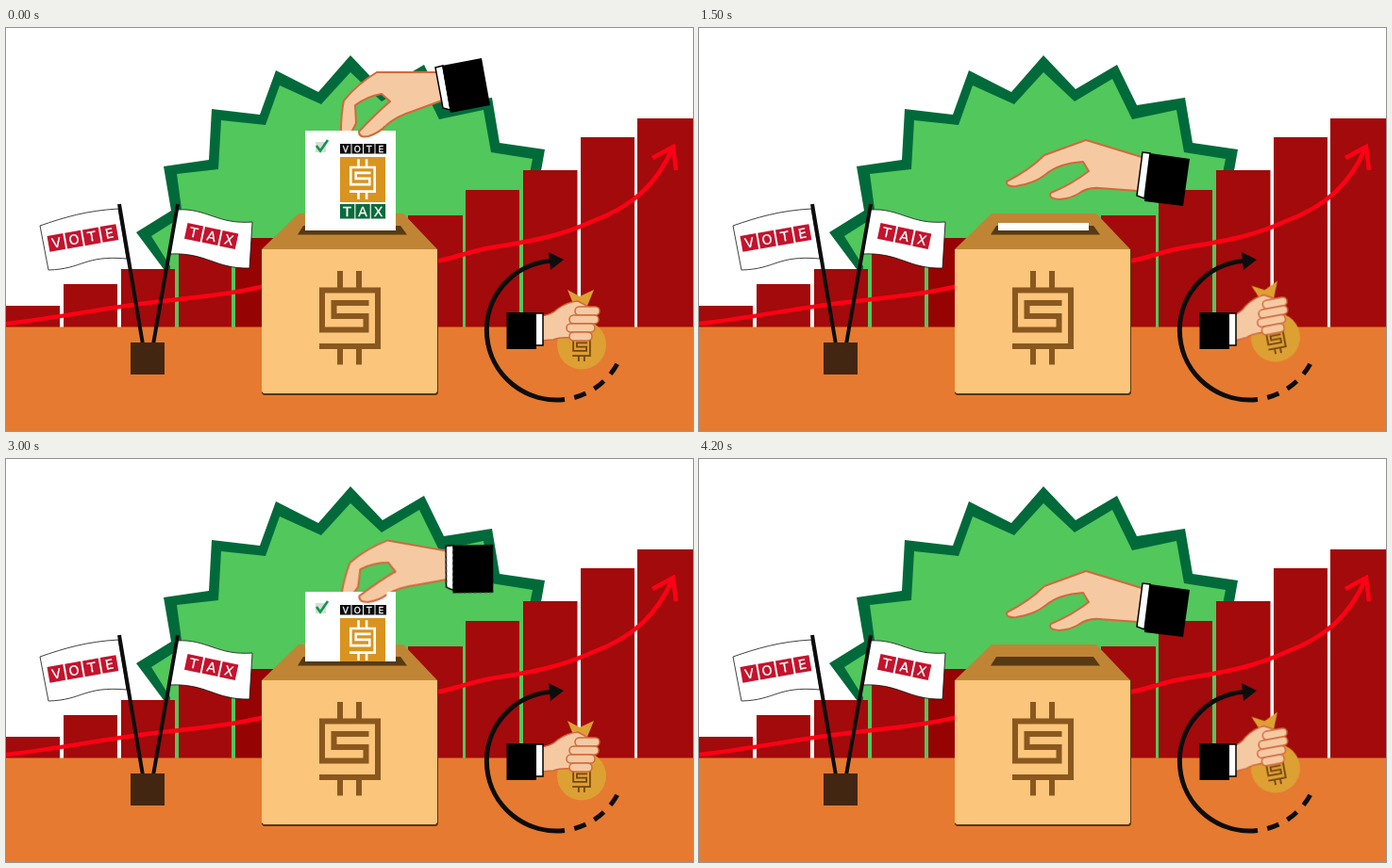
These frames come from a looping animation (728 px wide and 428 px high, 4.6 s). An HTML page:

```html
<!DOCTYPE html>
<html lang="en">
<head>
<meta charset="utf-8">
<title>Vote Tax</title>
<style>
  html, body { margin: 0; width: 100%; height: 100%; overflow: hidden; background: #fff; }
  svg { display: block; }
  text { font-family: "DejaVu Sans", sans-serif; fill: #fff; stroke: #fff; stroke-width: .3; text-anchor: middle; }
  .line { fill: none; stroke: #0d0d0d; }
  .skin { fill: #f5caa3; stroke: #d2693c; stroke-width: 2; stroke-linejoin: round; }
  .mark { fill: none; stroke-width: 6; }

  .card { animation: drop 2300ms step-end infinite; }
  .pinch { animation: pinch 2300ms step-end infinite; }
  .spread { animation: spread 2300ms step-end infinite; }
  .fist { animation: shake 4600ms step-end infinite; }

  @keyframes drop {
    0% { transform: none; }
    30.43% { transform: translateY(32px); }
    47.82% { transform: translateY(64px); }
    65.21% { transform: translateY(98px); }
    82.6%, 100% { transform: translateY(140px); }
  }
  @keyframes pinch {
    0% { transform: none; visibility: visible; }
    30.43% { transform: translate(356px, 141px) rotate(10deg) translate(-355px, -109px); visibility: visible; }
    47.82%, 100% { visibility: hidden; }
  }
  @keyframes spread {
    0% { visibility: hidden; }
    47.82%, 100% { visibility: visible; }
  }
  /* The fist swaps pose on every step of the ballot. */
  @keyframes shake {
    0%, 23.91%, 41.3%, 65.21%, 82.6% { transform: none; }
    15.21%, 32.6%, 50%, 73.91%, 91.3%, 100% {
      transform: translate(611px, 329px) rotate(-10.6deg) translate(-610px, -337px);
    }
  }
</style>
</head>
<body>
<svg width="728" height="428" viewBox="0 0 728 428">
  <defs>
    <g id="coin">
      <path d="M-10.500-31V-49.500M9.500-31V-49.500M-10.500 31V50M9.500 31V50"/>
      <path d="M20-15.500H-17V-1.500H17V13H-29.500V-29H29.500V30.500H-32.500"/>
    </g>
    <clipPath id="slot"><path d="M300 90H430V215H300Z"/></clipPath>
  </defs>

  <path fill="#006a3a" d="M138 217L175 194 167 147 215 140 218 86 269 92 286 45 331 68 365 29 399 65 443 39 464 82 515 74 523 122 571 129 562 180V318H170V260Z"/>
  <path fill="#52c75c" d="M154 221L187 200 181 155 225 150 228 98 275 103 290 61 334 81 365 47 398 78 438 54 459 97 506 87 514 132 558 139 551 175V318H174V253Z"/>
  <path fill="#a20a0b" d="M0 318V295H57V318ZM61 318V272H118V318ZM122 318V256H179V318ZM183 318V239H239V318ZM426 318V199H484V318ZM487 318V172H544V318ZM548 318V151H605.500V318ZM609 318V116H666V318ZM669 318V96H728V318Z"/>
  <path fill="#960303" d="M243 318V223H300V318Z"/>
  <path fill="#e67a30" d="M0 317.500H728V428H0Z"/>
  <g fill="none" stroke="#ff0015" stroke-width="4.500">
    <path d="M0 314C60 307 100 298 150 292S230 284 275 274M455 248C485 242 490 237 515 233C560 226 590 220 622 205C665 189 690 165 706 128"/>
    <path d="M685 138L707 126 710 151"/>
  </g>

  <g id="flags" stroke="#111" stroke-width=".8">
    <path fill="#fff" d="M36 210C62 201 85 194 119 192L128 245C82 241 82 256 45 257Z"/>
    <path fill="#fff" d="M181 193C213 191 224 209 261 206L258 255C222 256 212 238 174 240Z"/>
    <path class="line" stroke-width="4" d="M120 187L145 336M182 187L156 336"/>
    <path fill="#422611" stroke="none" d="M132 334H168V368H132Z"/>
  </g>

  <path fill="#57380f" d="M272 235H458V388L456 390H273L271 388Z"/>
  <path fill="#fbc57c" d="M271 235H457V386L455 388H273L271 386Z"/>
  <path fill="#bf8535" d="M271 235L310 197H421L457 235Z"/>
  <path fill="#573a13" d="M315 210H418L425 219.500H309Z"/>
  <use href="#coin" class="mark" stroke="#8a581f" x="364.500" y="307.500"/>

  <g class="pinch">
    <path class="skin" d="M458 47H393Q373 59 358 77Q355 92 355 109L360 113 367 109 371 101 370 82Q384 72 398 70L407 78Q392 91 374 110Q374 117 384 115Q396 111 402 104Q413 94 432 88L462 77"/>
    <path fill="#fff" stroke="#000" stroke-width="1.500" d="M455 42L463 40 471 87 463 85Z"/>
    <path fill="#000" d="M462 40L504 32 513 82 471 90Z"/>
  </g>

  <g clip-path="url(#slot)">
    <g class="card" id="card">
      <path fill="#fff" d="M317 109H413V330H317Z"/>
      <path fill="#d9dcd8" d="M328 121H339V132H328Z"/>
      <path fill="none" stroke="#0b9a4b" stroke-width="2.600" d="M329 125L333 130.500 341 119"/>
      <path fill="#d9941f" d="M354 137H402V185H354Z"/>
      <use href="#coin" class="mark" stroke="#fff" transform="translate(378 160.500) scale(.43)"/>
    </g>
  </g>

  <path class="pinch skin" d="M407 78Q392 91 374 110Q374 117 384 115Q396 111 402 104"/>
  <g class="spread">
    <path class="skin" d="M469 137L410 119 366 135Q350 151 326 163Q325 169 336 168Q356 165 368 155Q381 144 407 142L413 152Q395 166 373 175Q369 181 382 182Q394 181 402 176Q412 169 424 170L465 173"/>
    <path fill="#fff" stroke="#000" stroke-width="1.500" d="M470 132L478 133 472 181 464 178Z"/>
    <path fill="#000" d="M478 133L520 139 513 189 472 184Z"/>
  </g>

  <path class="line" stroke-width="5" d="M578 247.200A74 74 0 1 0 592 394.500"/>
  <path class="line" stroke-width="5" stroke-dasharray="13 10.200" d="M602.200 392.500A74 74 0 0 0 647.700 356.900"/>
  <path fill="#0d0d0d" d="M575 238L591 246 577 257Z"/>

  <g class="fist">
    <path fill="#dda033" d="M595 278L608 285 623 278 616 295H602Z"/>
    <circle cx="610" cy="336.500" r="26" fill="#dda033"/>
    <use href="#coin" class="mark" stroke="#734612" transform="translate(610 339) scale(.3)"/>
    <g class="skin" style="stroke-width:1.500">
      <path d="M566 306Q578 305 585 298Q595 291 606 290L617 296 600 329Q587 328 580 331L566 332"/>
      <rect x="603" y="296" width="26" height="9" rx="4.500"/>
      <rect x="597" y="305" width="31" height="9" rx="4.500"/>
      <rect x="594" y="314" width="30" height="9" rx="4.500"/>
      <rect x="597" y="323" width="24" height="9" rx="4.500"/>
    </g>
  </g>
  <path fill="#fff" stroke="#000" stroke-width="1.500" d="M561 303H569V337H561Z"/>
  <path fill="#000" d="M530.500 302H562V341H530.500Z"/>
</svg>
<script>
  function add(parent, name, attrs) {
    const node = document.createElementNS("http://www.w3.org/2000/svg", name);
    for (const key in attrs) node.setAttribute(key, attrs[key]);
    return parent.appendChild(node);
  }

  // A row of coloured tiles, one letter on each.
  function tiles(id, word, { x, y, w, h, step, fill, size, turn = 0 }) {
    const row = add(document.getElementById(id), "g",
      { transform: `translate(${x} ${y}) rotate(${turn})`, stroke: "none" });
    [...word].forEach((letter, i) => {
      add(row, "rect", { x: i * step, y: 0, width: w, height: h, fill });
      add(row, "text", { x: i * step + w / 2, y: h / 2 + size * 0.365, "font-size": size })
        .textContent = letter;
    });
  }

  tiles("card", "VOTE", { x: 354, y: 123, w: 11.5, h: 10.5, step: 12.5, fill: "#0b0b0b", size: 9 });
  tiles("card", "TAX", { x: 354, y: 187, w: 15.3, h: 15.5, step: 16.4, fill: "#0a6b3c", size: 14 });
  const red = { w: 17, h: 17, step: 19, fill: "#c4132d", size: 14 };
  tiles("flags", "VOTE", { ...red, x: 43.5, y: 221, turn: -10 });
  tiles("flags", "TAX", { ...red, x: 192.5, y: 207, turn: 12 });
</script>
</body>
</html>
```
